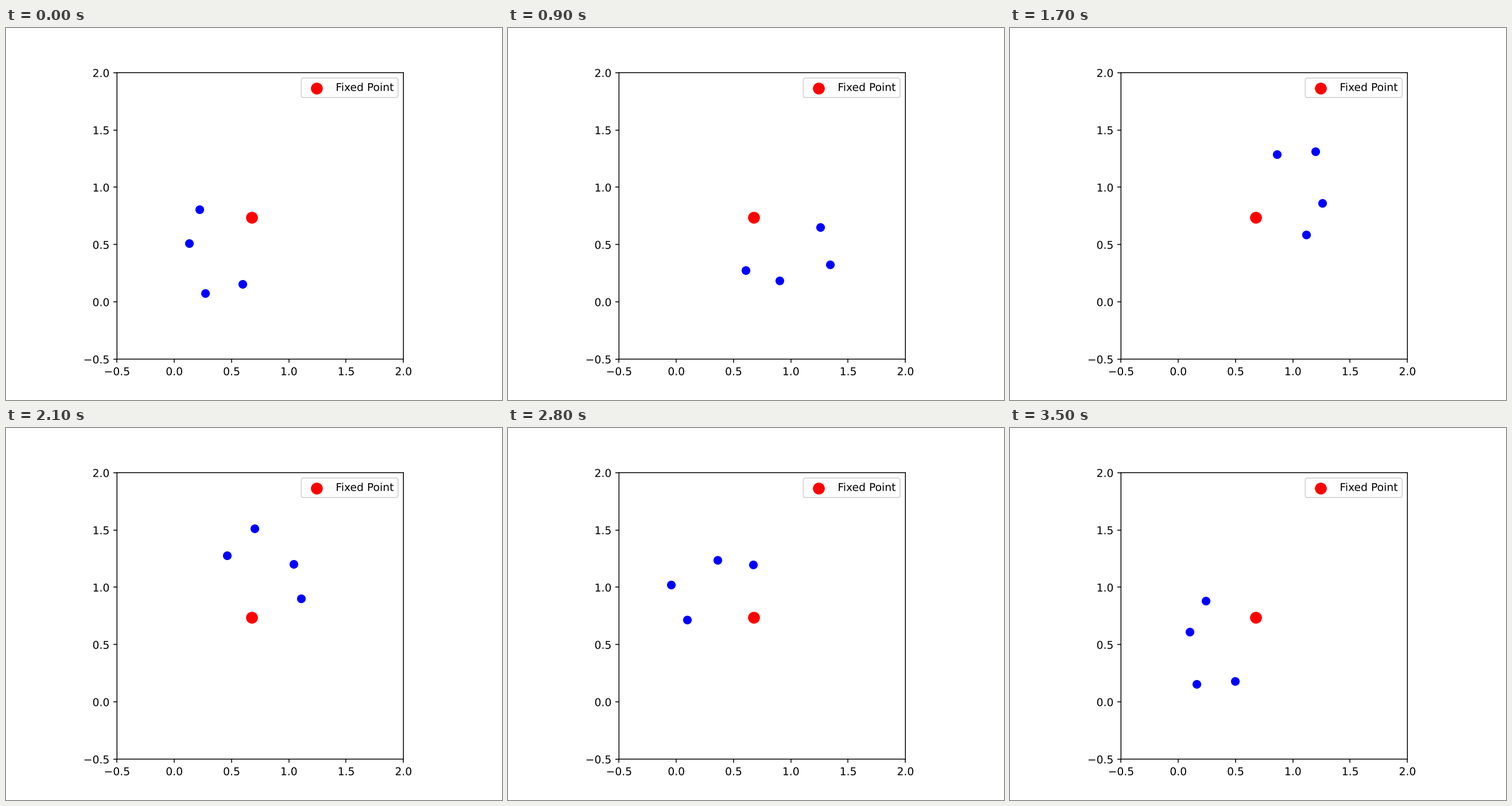
These frames come from a looping animation (864 px wide and 648 px high, 3.6 s). A matplotlib script:

```python
import matplotlib.pyplot as plt
import numpy as np
from matplotlib.animation import FuncAnimation
from matplotlib.patheffects import Normal

FRAMES = 36
INTERVAL = 100

# Draw lines, markers and glyphs at sub-pixel positions
plt.rcParams.update({"path.snap": False, "path.effects": [Normal()]})

# Positions in the complex plane
center = 0.6779 + 0.7342j
start = np.array([0.2212 + 0.8051j, 0.1300 + 0.5105j,
                  0.2675 + 0.0723j, 0.5932 + 0.1565j])


def rotated(turn):
    """Points after a counter-clockwise turn (1 = full circle) about the center."""
    z = center + (start - center) * np.exp(2j * np.pi * turn)
    return np.column_stack([z.real, z.imag])


fig, ax = plt.subplots(figsize=(6.4, 4.8), dpi=135)
ax.set(xlim=(-0.5, 2), ylim=(-0.5, 2), aspect="equal")

points = ax.scatter(start.real, start.imag, s=50, color="blue")
ax.scatter(center.real, center.imag, s=100, color="red", label="Fixed Point")
ax.legend(loc="upper right")


def update(frame):
    points.set_offsets(rotated(frame / FRAMES))
    return (points,)


anim = FuncAnimation(fig, update, frames=FRAMES, interval=INTERVAL,
                     repeat=True, repeat_delay=0)
plt.show()
```
